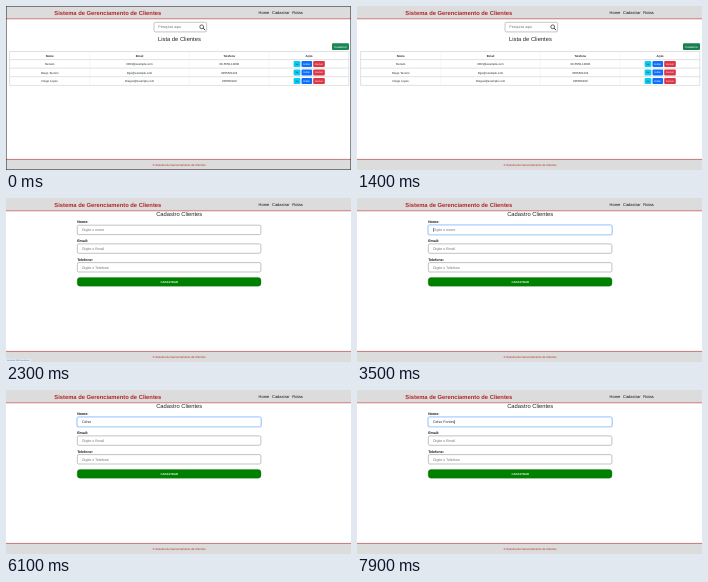
Write an HTML page that moves like this. It is 345 by 164 pixels and loops after 8 s.

```html
<!DOCTYPE html>
<html lang="pt-BR">
<head>
<meta charset="utf-8">
<title>Sistema de Gerenciamento de Clientes</title>
<style>
  html, body { margin: 0; width: 100%; height: 100%; overflow: hidden; background: #fff; }
  svg { display: block; width: 100vw; height: 100vh; }
  text {
    font-family: "Liberation Sans", Arial, sans-serif;
    text-rendering: geometricPrecision;
    white-space: pre;
  }
</style>
</head>
<body>
<svg id="stage" viewBox="0 0 345 164"></svg>
<script>
const LOOP = 8000;
const RED = '#b3262a', DARK = '#212529', GRAY = '#6c7075';

const text = (x, y, size, content, { fill = DARK, anchor = 'start', bold = false, id = '' } = {}) =>
  `<text ${id && `id="${id}"`} x="${x}" y="${y}" font-size="${size}" fill="${fill}"
    text-anchor="${anchor}" font-weight="${bold ? 700 : 400}">${content}</text>`;
const centered = (x, y, size, content, options) =>
  text(x, y, size, content, { anchor: 'middle', ...options });
const box = (x, y, w, h, fill, extra = '') =>
  `<rect x="${x}" y="${y}" width="${w}" height="${h}" fill="${fill}" ${extra}/>`;
const line = (x1, y1, x2, y2, color, width) =>
  `<path d="M${x1} ${y1}L${x2} ${y2}" stroke="${color}" stroke-width="${width}"/>`;
const button = (x, y, w, h, fill, label, size, color = '#fff') =>
  box(x, y, w, h, fill, 'rx="1"') +
  centered(x + w / 2, y + h / 2 + size * 0.35, size, label, { fill: color });

function shell() {
  return box(0, 0, 345, 12.6, '#dcdcdc') + line(0, 12.8, 345, 12.8, RED, 0.6) +
    text(48.3, 8.6, 5.8, 'Sistema de Gerenciamento de Clientes', { fill: RED, bold: true }) +
    [[252.6, 'Home'], [266, 'Cadastrar'], [286.3, 'Rotas']]
      .map(([x, label]) => text(x, 7.9, 4, label, { fill: '#111' })).join('') +
    box(0, 153.4, 345, 10.6, '#dcdcdc') + line(0, 153.4, 345, 153.4, RED, 0.6) +
    centered(173, 159.7, 2.9, '© Sistema de Gerenciamento de Clientes', { fill: RED });
}

function listPage() {
  const clients = [
    ['Renato', 'REN@example.com', '00-5550-10000'],
    ['Diego Tavorni', 'Dgo@example.com', '0055501234'],
    ['Diego Lopes', 'Dieguz@example.com', '005550199'],
  ];
  const columns = [43.7, 133.5, 223.3, 303];
  const search = box(148, 16.3, 52.7, 9.6, '#fff', 'rx="1.5" stroke="#8d8d8d" stroke-width=".5"') +
    text(152.3, 22.4, 3.65, 'Pesquise aqui', { fill: GRAY }) +
    '<g fill="none" stroke="#111" stroke-width=".65"><circle cx="195.7" cy="20.8" r="1.9"/>' +
    '<path d="M197.1 22.2L199.1 24.2" stroke-width=".9"/></g>';
  const grid = [45.5, 53.6, 62.1, 70.7, 79.4].map(y => line(3.6, y, 342.8, y, '#b9bdc1', 0.45)).join('') +
    [3.6, 342.8].map(x => line(x, 45.5, x, 79.4, '#b9bdc1', 0.45)).join('') +
    [83.7, 183.3, 263.2].map(x => line(x, 45.5, x, 79.4, '#dee2e6', 0.3)).join('');
  const heads = ['Nome', 'Email', 'Telefone', 'Ação']
    .map((label, i) => centered(columns[i], 50.5, 2.9, label, { bold: true })).join('');
  const rows = clients.map((client, r) => {
    const y = 57.9 + r * 8.6;
    return client.map((value, i) => centered(columns[i], y + 1, 2.9, value)).join('') +
      button(287.6, y - 3, 6.8, 6, '#0dcaf0', 'Ver', 2.1, '#111') +
      button(295.5, y - 3, 10.6, 6, '#0d6efd', 'Editar', 2.5) +
      button(307.2, y - 3, 11.6, 6, '#dc3545', 'Excluir', 2.5);
  }).join('');
  return search + centered(173.4, 34.9, 5.8, 'Lista de Clientes') +
    `<g id="newButton" fill="#198754">${box(326, 37.3, 17, 6.8, 'inherit', 'rx="1"')}</g>` +
    centered(334.5, 41.7, 2.85, 'Cadastrar', { fill: '#fff' }) + grid + heads + rows;
}

function formPage() {
  const fields = [['Nome:', 'Digite o nome'], ['Email:', 'Digite o Email'], ['Telefone:', 'Digite o Telefone']];
  return centered(173.2, 18.2, 5.8, 'Cadastro Clientes') +
    box(70.8, 26.8, 184.6, 10.2, 'none', 'id="glow" rx="2" stroke="#0d6efd" stroke-opacity=".28" stroke-width="1.1"') +
    fields.map(([label, hint], i) => {
      const y = 27.2 + i * 18.7;
      return text(71.2, y - 2, 3.6, label, { bold: true, fill: '#111' }) +
        box(71.3, y, 183.6, 9.4, '#fff', `id="field${i}" rx="1.5" stroke="#858585" stroke-width=".5"`) +
        text(76, y + 6, 3.6, hint, { fill: GRAY, id: 'hint' + i });
    }).join('') +
    text(76, 33.2, 3.6, '', { id: 'typed' }) +
    box(76, 30, 0.4, 4, '#111', 'id="caret"') +
    box(71.2, 79.4, 183.8, 8.8, '#008000', 'rx="3" stroke="#066b06" stroke-width=".3"') +
    centered(163.2, 84.8, 2.75, 'CADASTRAR', { fill: '#fff', bold: true });
}

document.getElementById('stage').innerHTML = box(0, 0, 345, 164, '#fff') + shell() +
  `<g id="list">${listPage()}</g><g id="form">${formPage()}</g>` +
  `<g id="status">${box(0, 160.9, 25, 3.1, '#e8ebef')}` +
  text(1, 163.3, 2.1, 'localhost:3000/cadastrar', { fill: '#2878c8' }) + '</g>' +
  box(0, 0, 345, 164, 'none', 'id="edge" stroke="#111" stroke-width="1.2"');

const el = id => document.getElementById(id);
const show = (id, visible) => { el(id).style.display = visible ? '' : 'none'; };
const ramp = (t, from, to) => Math.min(1, Math.max(0, (t - from) / (to - from)));
const mix = (a, b, k) => `rgb(${a.map((v, i) => Math.round(v + (b[i] - v) * k))})`;

const typedName = 'Celso Fontes';
const keyTimes = [4400, 4600, 5100, 5400, 5500, 6200, 6800, 7000, 7100, 7400, 7700, 7900];
const caretGaps = [[3900, 4400], [6100, 6200], [6700, 6800]];

function draw(t) {
  const onForm = t >= 2300;
  show('list', !onForm);
  show('form', onForm);
  el('edge').style.opacity = 0.8 * (1 - ramp(t, 0, 400));
  el('newButton').setAttribute('fill', mix([25, 135, 84], [20, 108, 67], ramp(t, 1350, 1550)));
  el('status').style.opacity = t < 2700 ? ramp(t, 1500, 2000) : 0;

  const focus = ramp(t, 3300, 3500);
  el('glow').style.opacity = focus;
  el('field0').setAttribute('stroke', mix([133, 133, 133], [134, 183, 254], focus));

  const count = keyTimes.filter(k => t >= k).length;
  const typed = el('typed');
  typed.textContent = typedName.slice(0, count);
  show('hint0', count === 0);
  show('caret', t >= 3400 && !caretGaps.some(([from, to]) => t >= from && t < to));
  el('caret').setAttribute('x', 76 + (count && onForm ? typed.getComputedTextLength() : 0));
}

const start = performance.now();
function tick() {
  draw((performance.now() - start) % LOOP);
  requestAnimationFrame(tick);
}
tick();
</script>
</body>
</html>
```
